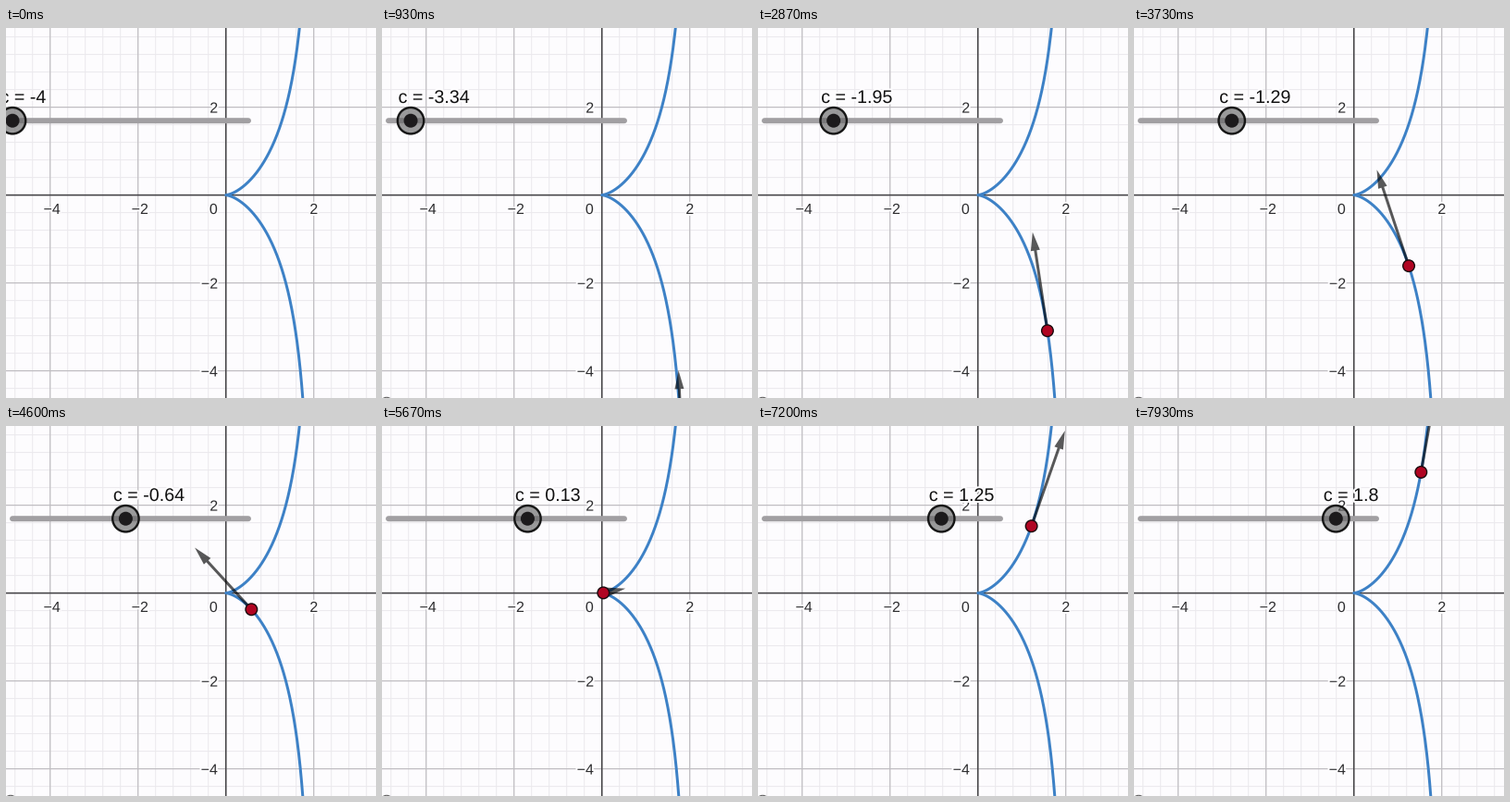
Write a matplotlib script that moves like this. It is 400 px wide and 400 px high and loops after 8000 ms.

```python
import numpy as np
import matplotlib.pyplot as plt
from matplotlib.animation import FuncAnimation
from matplotlib.patches import Circle, Polygon
from matplotlib.patheffects import withStroke

SIZE, DPI = 400, 100
FRAMES, LOOP_MS = 240, 8000
OX, OY, UNIT = 237.7, 180.6, 47.5
TRACK_X, TRACK_Y, TRACK_STEP = 7, 100.2, 255 / 7
PAPER, INK = "#fdfcfe", "#2e2e30"

plt.rcParams["font.family"] = "Liberation Sans"


def pt(px):
    return px * 72 / DPI


def to_px(x, y):
    return OX + UNIT * x, OY - UNIT * y


def cissoid(t):
    d = 1 + t * t
    return 2 * t**2 / d, 2 * t**3 / d


def velocity(t):
    d = (1 + t * t) ** 2
    return 4 * t / d, 2 * (3 * t**2 + t**4) / d


def slider_value(step):
    # Nearly constant speed, with small timing drift
    c = np.interp(step, [0, 28, 43, 69, 85, 98, 119],
                  [-4, -2.68, -1.95, -0.64, 0.13, 0.75, 1.8])
    return round(float(c), 2) + 0.0


def text(x, y, s, px, z, **kw):
    halo = [withStroke(linewidth=pt(4), foreground=PAPER)]
    return ax.text(x, y, s, fontsize=pt(px), zorder=z, path_effects=halo, **kw)


def disc(r, z, **kw):
    return ax.add_patch(Circle((0, 0), r, zorder=z, **kw))


fig = plt.figure(figsize=(SIZE / DPI, SIZE / DPI), dpi=DPI, facecolor=PAPER)
ax = fig.add_axes([0, 0, 1, 1])
ax.set_xlim(0, SIZE)
ax.set_ylim(SIZE, 0)
ax.axis("off")


def rules(values, color, width, z):
    x, y = to_px(values, values)
    style = dict(colors=color, linewidths=pt(width), zorder=z, snap=False)
    ax.vlines(x, 0, SIZE, **style)
    ax.hlines(y, 0, SIZE, **style)


rules(0.4 * np.arange(-15, 16), "#ebe9ed", 1, 1)
rules(2.0 * np.arange(-3, 4), "#bfbdc1", 1.2, 1.1)
rules(np.zeros(1), "#414043", 1.5, 1.2)

for v in (-4, -2, 2):
    label = str(v).replace("-", "\u2212")
    x, y = to_px(v, v)
    text(x + (2 if v < 0 else 0), 201, label, 16, 2, ha="center", color=INK)
    text(229, y + 6, label, 16, 2, ha="right", color=INK)
text(224.3, 201, "0", 16, 2, ha="center", color=INK)

ax.plot(*to_px(*cissoid(np.linspace(-5, 5, 601))), color="#3d81c6",
        lw=pt(3), zorder=3)

arrow = ax.add_patch(Polygon([(0, 0)] * 3, closed=True, fc="black", ec="none",
                             alpha=0.65, zorder=4))
point = disc(6.3, 5, fc="#b00522", ec="#1a0a0e", lw=pt(1.4))

ax.plot([TRACK_X, TRACK_X + 7 * TRACK_STEP], [TRACK_Y] * 2, color="#a19fa2",
        lw=pt(6), solid_capstyle="round", zorder=6, snap=False)
knob = [disc(14.2, 7, fc=(0.4, 0.4, 0.4, 0.65), ec="#161616", lw=pt(2.4)),
        disc(7.5, 8, fc="#1c1a1c", ec="none")]
caption = text(0, 81, "", 19.7, 9, color="#111111")
button = disc(7.5, 5, fc="none", ec="#555555", lw=pt(1))
button.center = 5, 406.8


def arrow_shape(start, end, head=20, half=1.5):
    start, end = np.array(start), np.array(end)
    length = np.hypot(*(end - start))
    if length < 1e-6:
        return [start] * 3
    u = (end - start) / length
    n = np.array([-u[1], u[0]])
    neck = end - u * head
    wing = n * head / 4
    if length <= head:
        return [neck + wing, end, neck - wing]
    side = n * half
    return [start + side, neck + side, neck + wing, end,
            neck - wing, neck - side, start - side]


def update(i):
    step = (i + 1) // 2  # the picture changes on every second frame
    c = slider_value(step)
    x, y = cissoid(c)
    dx, dy = velocity(c)
    point.center = to_px(x, y)
    arrow.set_xy(arrow_shape(to_px(x, y), to_px(x + dx, y + dy)))
    kx = TRACK_X + (c + 4) * TRACK_STEP
    for part in knob:
        part.center = kx, TRACK_Y
    caption.set_x(kx - 13.5)
    caption.set_text(f"c = {c:g}")
    button.set_visible(step > 0)
    return [point, arrow, caption, button, *knob]


anim = FuncAnimation(fig, update, frames=FRAMES, interval=LOOP_MS / FRAMES,
                     repeat=True, repeat_delay=0)
plt.show()
```
